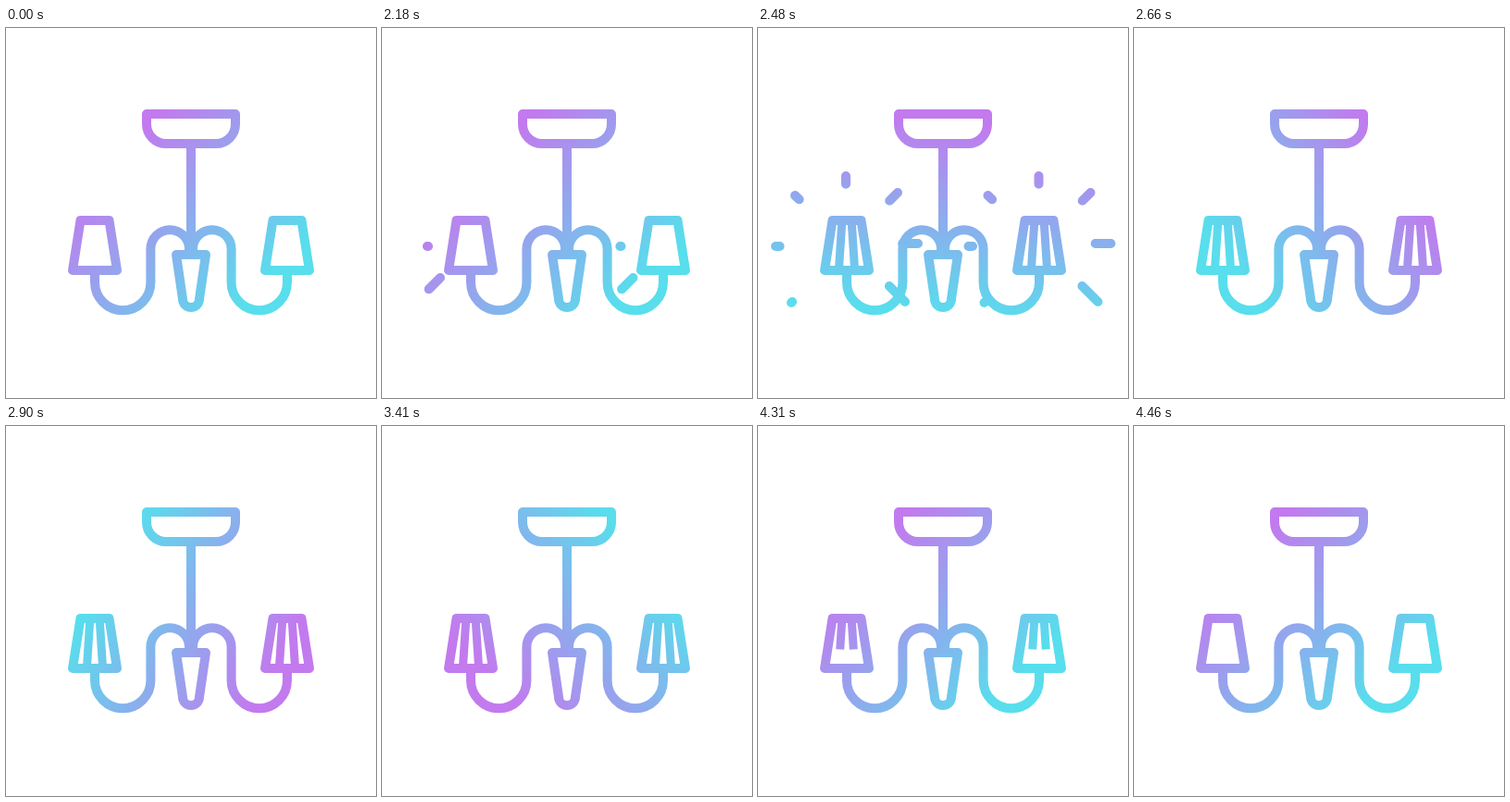
Recreate the animation shown at these times as an HTML page. Size 400 by 400 pixels, loop 4.49 s.

```html
<!DOCTYPE html>
<html lang="en">
<head>
<meta charset="utf-8">
<title>Chandelier</title>
<style>
  html, body { margin: 0; height: 100%; overflow: hidden; background: #fff; }
  svg { display: block; width: 100vw; height: 100vh; }
</style>
</head>
<body>
<svg viewBox="0 0 400 400" fill="none" stroke="url(#tint)" stroke-width="10" stroke-linejoin="round">
  <defs>
    <linearGradient id="tint" gradientUnits="userSpaceOnUse" x1="95" y1="206" x2="305" y2="206">
      <stop stop-color="#c27aee"/>
      <stop offset="1" stop-color="#58deec"/>
    </linearGradient>
  </defs>
  <!-- canopy, stem, centre bulb -->
  <path d="M152 93H248V104a21 21 0 0 1-21 21H173a21 21 0 0 1-21-21Z"/>
  <path d="M200 125V240"/>
  <path d="M184 245H216L209 293a9 9 0 0 1-18 0Z"/>
  <!-- arms -->
  <path d="M96 262V275a30.2 30.2 0 0 0 60.4 0V239a20.8 20.8 0 0 1 41.6 0V242"/>
  <path d="M304 262V275a30.2 30.2 0 0 1-60.4 0V239a20.8 20.8 0 0 0-41.6 0V242"/>
  <!-- shades -->
  <path d="M80.5 208H111.5L120 262H72Z"/>
  <path d="M288.5 208H319.5L328 262H280Z"/>
  <path id="pleats" stroke-width="9"/>
  <path id="rays" stroke-linecap="round"/>
</svg>
<script>
const LOOP = 4490;
const LAMP_GAP = 208.5;

// Rays of the left lamp in order of appearance: inner x, y, outer x, y
const RAYS = [
  [63, 270, 36, 297], [50, 236, 19, 236], [58, 198, 40, 181], [95, 184, 95, 160],
  [132, 197, 151, 178], [143, 233, 173, 233], [133, 270, 159, 296]
];

const tint = document.getElementById('tint');
const pleats = document.getElementById('pleats');
const rays = document.getElementById('rays');

const phase = (t, start, length) => Math.min(1, Math.max(0, (t - start) / length));
const mix = (a, b, p) => a + (b - a) * p;
const segment = (x1, y1, x2, y2) => `M${x1} ${y1}L${x2} ${y2}`;

// Cubic easing with control points (x1, 0) and (x2, 1)
function ease(p, x1, x2) {
  let low = 0, high = 1;
  for (let i = 0; i < 24; i++) {
    const s = (low + high) / 2, r = 1 - s;
    if (3 * s * r * (r * x1 + s * x2) + s ** 3 < p) low = s; else high = s;
  }
  return low * low * (3 - 2 * low);
}

function rayPath(t) {
  return RAYS.map(([x1, y1, x2, y2], i) => {
    const start = 2152 + 27 * i;
    const head = 1 - (1 - phase(t, start, 110)) ** 2;
    const tail = phase(t, start + 48, 290) ** 1.2;
    if (t < start || tail >= 1) return '';
    return [0, LAMP_GAP].map(dx => segment(
      mix(x1, x2, tail) + dx, mix(y1, y2, tail),
      mix(x1, x2, head) + dx, mix(y1, y2, head))).join('');
  }).join('');
}

function pleatPath(t) {
  const grown = phase(t, 2180, 210) - phase(t, 4220, 240);
  if (grown <= 0) return '';
  return [96, 304].map(x => [-1, 1].map(side =>
    segment(x + side * 5.3, 211, x + side * mix(5.3, 8.5, grown), mix(211, 260, grown))
  ).join('')).join('');
}

function draw(now) {
  const t = now % LOOP;
  const angle = 45 + 360 * ease(phase(t, 2160, 2300), 0.17, 0.43);
  tint.setAttribute('gradientTransform', `rotate(${angle} 200 206)`);
  rays.setAttribute('d', rayPath(t));
  pleats.setAttribute('d', pleatPath(t));
}

const begin = performance.now();
function frame() {
  draw(performance.now() - begin);
  requestAnimationFrame(frame);
}
frame();
</script>
</body>
</html>
```
